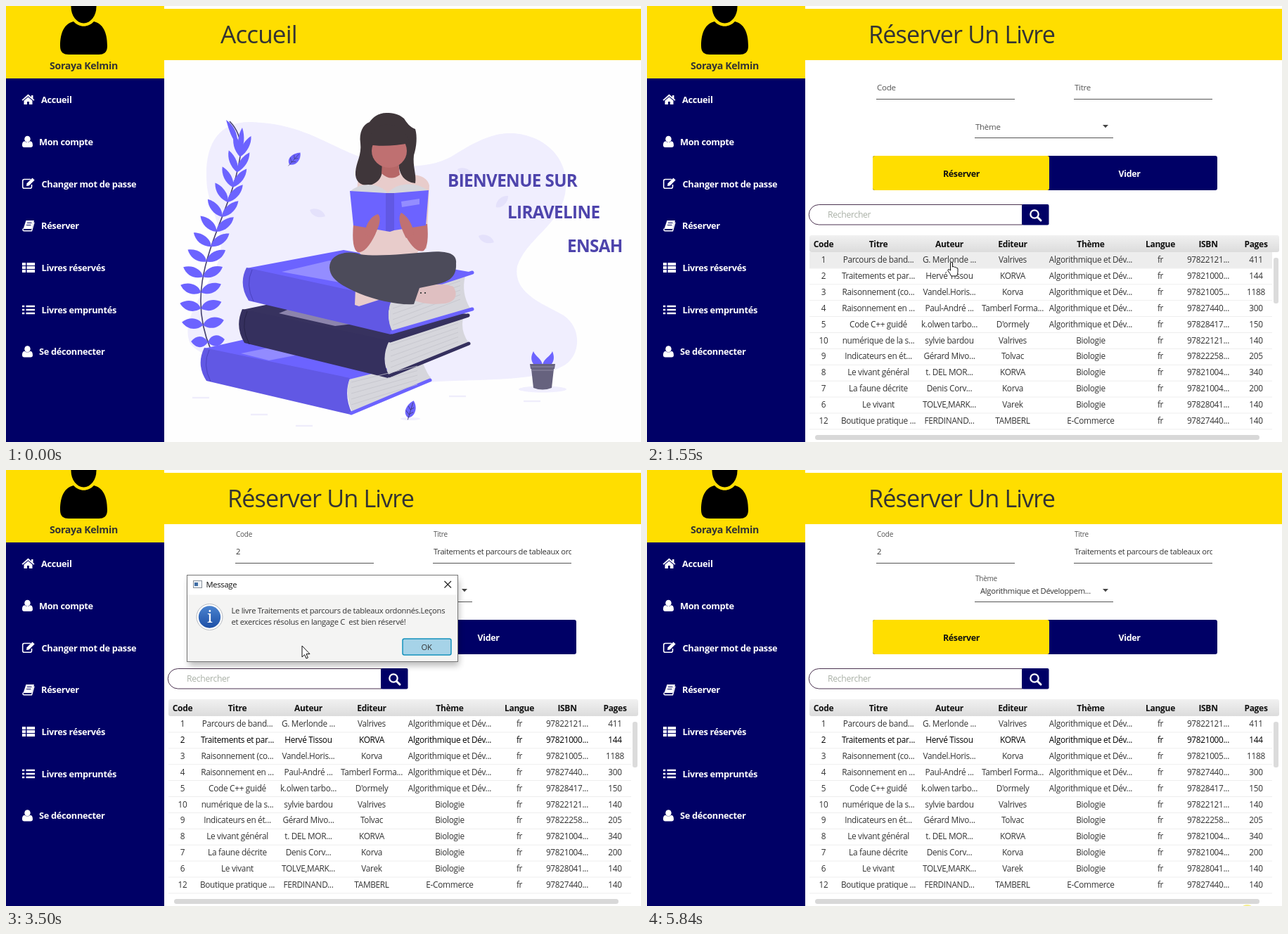
An HTML page that plays this animation: 903 px wide and 620 px high, repeating every 5.93 s.

```html
<!DOCTYPE html>
<html lang="fr">
<head>
<meta charset="utf-8">
<title>Réserver un livre</title>
<style>
html, body { margin: 0; width: 100%; height: 100%; overflow: hidden; background: #fff; }
svg { display: block; }
text { font: 11.2px "Open Sans", "Noto Sans", sans-serif; letter-spacing: -.025em; fill: #333; white-space: pre; }
.b { font-weight: 700; }
.mid { text-anchor: middle; }
.menu text { font-size: 12.8px; font-weight: 700; fill: #fff; }
.title { font-size: 34.2px; }
.hello text { font-size: 24.2px; font-weight: 700; fill: #4e44ac; }
.head text { font-size: 12px; font-weight: 700; fill: #111; text-anchor: middle; }
.rows text { font-size: 11.8px; }
.label { font-size: 11.5px; fill: #555; }
.line { stroke: #555; }

/* every change on screen is a hard step */
.an { animation: 5.93s step-end infinite; }
#home { animation-name: home; }
@keyframes home { 0% { opacity: 1 } 14.33%, 100% { opacity: 0 } }

#side { animation-name: side; }
@keyframes side {
  0% { opacity: 0; transform: translateY(60px) }
  2.19% { opacity: 1; transform: translateY(60px) }
  7.58% { opacity: 1; transform: none }
  15.68%, 100% { opacity: 0; transform: none }
}
#hover { animation-name: hover; }
@keyframes hover {
  0% { opacity: 0; transform: none }
  19.73% { opacity: 1; transform: none }
  28.83% { opacity: 1; transform: translateY(22.9px) }
  42.32% { opacity: 0; transform: none }
  80.26% { opacity: 1; transform: none }
  81.45% { opacity: 1; transform: translateY(114.5px) }
  82.79% { opacity: 1; transform: translateY(137.4px) }
  84.14% { opacity: 1; transform: translateY(183.2px) }
  85.32% { opacity: 1; transform: translateY(206.1px) }
  86.5% { opacity: 1; transform: translateY(229px) }
  87.68%, 100% { opacity: 0; transform: none }
}
.picked text { animation: picked 5.93s step-end infinite; }
@keyframes picked { 35.41%, 100% { fill: #000 } }

#values { animation-name: values; }
@keyframes values { 0% { opacity: 0 } 35.41%, 100% { opacity: 1 } }
.float { animation-name: float; transform-origin: var(--x) var(--y); }
@keyframes float {
  0% { transform: none }
  35.41% { transform: translateY(calc(var(--d) * .6)) scale(.93) }
  36.76%, 100% { transform: translateY(var(--d)) scale(.87) }
}
#press { animation-name: press; }
@keyframes press { 0% { opacity: 0 } 44.35% { opacity: 1 } 59.02%, 100% { opacity: 0 } }
#ripple { animation-name: ripple; transform-origin: 421px 248px; }
@keyframes ripple {
  0% { transform: scale(0); opacity: .31 }
  48.39% { transform: scale(.1) }
  49.74% { transform: scale(.32) }
  51.09% { transform: scale(.58) }
  52.44% { transform: scale(.84) }
  53.62% { transform: scale(1); opacity: .31 }
  55.14% { transform: scale(1); opacity: .15 }
  56.49%, 100% { transform: scale(1); opacity: 0 }
}
#dialog { animation-name: dialog; transform-origin: 450px 210.5px; }
@keyframes dialog {
  0% { opacity: 0; transform: scale(.92) }
  56.49% { opacity: .45; transform: scale(.95) }
  57.84% { opacity: .9; transform: scale(.99) }
  59.02% { opacity: 1; transform: none }
  80.26% { opacity: .85; transform: scale(.992) }
  81.45% { opacity: .53; transform: scale(.981) }
  82.79% { opacity: .18; transform: scale(.965) }
  84.14%, 100% { opacity: 0; transform: scale(.95) }
}
#ok { animation-name: ok; }
@keyframes ok { 69.47% { fill: #c4e8f8 } 78.92%, 100% { fill: #8cc5e0 } }

#cursor { animation-name: move; }
@keyframes move {
  0% { transform: translate(-50px, 0) }
  1.18% { transform: translate(275px, 443px) }
  2.19% { transform: translate(150px, 388px) }
  6.23% { transform: translate(146px, 372px) }
  7.58% { transform: translate(138px, 340px) }
  8.93% { transform: translate(136px, 331px) }
  15.68% { transform: translate(232px, 340px) }
  17.03% { transform: translate(325px, 350px) }
  18.38% { transform: translate(392px, 358px) }
  19.73% { transform: translate(425px, 363px) }
  20.91% { transform: translate(433px, 364px) }
  27.48% { transform: translate(434px, 369px) }
  28.83% { transform: translate(435px, 377px) }
  30.18% { transform: translate(436px, 385px) }
  31.53% { transform: translate(436px, 390px) }
  42.32% { transform: translate(431px, 345px) }
  43.33% { transform: translate(426px, 290px) }
  44.35% { transform: translate(423px, 250px) }
  65.43% { transform: translate(452px, 249px) }
  66.77% { transform: translate(505px, 248px) }
  68.12% { transform: translate(558px, 247px) }
  69.47% { transform: translate(590px, 247px) }
  70.82% { transform: translate(602px, 247px) }
  80.26% { transform: translate(704px, 362px) }
  81.45% { transform: translate(801px, 466px) }
  82.79% { transform: translate(826px, 508px) }
  84.14% { transform: translate(846px, 546px) }
  85.32% { transform: translate(859px, 575px) }
  86.5% { transform: translate(869px, 598px) }
  87.68% { transform: translate(876px, 615px) }
  89.03%, 100% { transform: translate(-50px, 0) }
}
#hand { animation-name: hand; }
#arrow { animation-name: arrow; }
@keyframes hand {
  0% { opacity: 0 } 2.19% { opacity: 1 } 15.68% { opacity: 0 } 22.26% { opacity: 1 }
  42.32% { opacity: 0 } 44.35% { opacity: 1 } 56.49% { opacity: 0 } 80.26% { opacity: 1 }
  87.68%, 100% { opacity: 0 }
}
@keyframes arrow {
  0% { opacity: 1 } 2.19% { opacity: 0 } 15.68% { opacity: 1 } 22.26% { opacity: 0 }
  42.32% { opacity: 1 } 44.35% { opacity: 0 } 56.49% { opacity: 1 } 80.26% { opacity: 0 }
  87.68%, 100% { opacity: 1 }
}
#glow { animation-name: glow; }
@keyframes glow { 0% { opacity: 0 } 98.48%, 100% { opacity: 1 } }
</style>
</head>
<body>
<svg width="903" height="620" viewBox="0 0 903 620">
<defs>
  <linearGradient id="gHead" x2="0" y2="1"><stop stop-color="#f1f1f1"/><stop offset="1" stop-color="#dcdcdc"/></linearGradient>
  <linearGradient id="gInfo" x2="0" y2="1"><stop stop-color="#4a83cf"/><stop offset="1" stop-color="#1d4fa6"/></linearGradient>
  <clipPath id="cTitle"><rect x="607" y="105" width="197" height="24"/></clipPath>
  <clipPath id="cBtn"><rect x="321" y="213" width="251" height="49" rx="3"/></clipPath>
  <filter id="blur" x="-10%" y="-20%" width="120%" height="140%"><feGaussianBlur stdDeviation="5"/></filter>
  <g id="user" fill="#fff"><ellipse cx="7.5" cy="4.3" rx="4.2" ry="4.6"/><path d="M0 13C0 9 1.3 7.4 3.6 7.2Q7.5 11 11.4 7.2C13.7 7.4 15 9 15 13Q15 16 12 16H3Q0 16 0 13Z"/></g>
  <g id="leaf"><path fill="#6c63ff" d="M-8 9C-13 0-3-9 10-9C11 2 2 12-8 9Z"/><path d="M-10 11L8-7M-5 5L-6-2M-5 5L2 5M0 0V-6M0 0L6 0" fill="none" stroke="#3f3d75" stroke-width=".8"/></g>
  <path id="pale" fill="#e4e1fb" d="M-11-4C-4-8 8-5 11 5C3 8-8 6-11-4Z"/>
</defs>

<rect width="903" height="620" fill="#fff"/>
<rect x="225" y="4" width="678" height="73" fill="#ffde00"/>

<g id="page">
  <text class="title" x="315" y="53">Réserver Un Livre</text>
  <path class="line" d="M326 132.5H523M607 132.5H804M466 187.5H663"/>
  <text class="label an float" style="--x:327px;--y:120px;--d:-24.5px" x="327" y="120">Code</text>
  <text class="label an float" style="--x:608px;--y:120px;--d:-24.5px" x="608" y="120">Titre</text>
  <text class="label an float" style="--x:467px;--y:176px;--d:-18px" x="467" y="176">Thème</text>
  <path d="M648 169h8l-4 4.2z" fill="#444"/>
  <g id="values" class="an">
    <text x="327" y="120">2</text>
    <text x="608" y="120" clip-path="url(#cTitle)">Traitements et parcours de tableaux ordonnés</text>
    <text x="474" y="176">Algorithmique et Développem...</text>
  </g>
  <rect x="321" y="213" width="490" height="49" rx="3" fill="#000066"/>
  <rect x="321" y="213" width="251" height="49" rx="3" fill="#ffde00"/>
  <text class="b mid" x="447" y="242.5" style="font-size:12.4px;fill:#111">Réserver</text>
  <text class="b mid" x="686" y="242.5" style="font-size:12.4px;fill:#fff">Vider</text>
  <g id="press" class="an" clip-path="url(#cBtn)">
    <rect x="321" y="213" width="251" height="49" fill="#000066"/>
    <circle id="ripple" class="an" cx="421" cy="248" r="65" fill="#fff"/>
    <text class="b mid" x="447" y="242.5" style="font-size:12.4px;fill:#fff">Réserver</text>
  </g>
  <path d="M534 282.5H244.5a14.2 14.2 0 0 0 0 28.5H534z" fill="#fff" stroke="#4b3350"/>
  <text x="257" y="301" style="font-size:12.2px;fill:#a9b0a6">Rechercher</text>
  <rect x="533" y="282" width="38.5" height="29.5" rx="2" fill="#000066"/>
  <path d="M555.5 300.5L560 305" stroke="#fff" stroke-width="3" stroke-linecap="round"/>
  <circle cx="551" cy="296" r="5.7" fill="none" stroke="#fff" stroke-width="2.3"/>
  <rect x="231" y="326" width="668" height="24" rx="3" fill="url(#gHead)"/>
  <g id="head" class="head"></g>
  <rect id="hover" class="an" x="231" y="350" width="658" height="22.9" fill="#ededed"/>
  <g id="rows" class="rows"></g>
  <rect x="891" y="358" width="7" height="65" rx="3" fill="#dbdbdb"/>
  <rect x="239" y="610" width="632" height="7" rx="3.5" fill="#d8d8d8"/>
</g>

<g id="home" class="an">
  <rect x="225" y="77" width="678" height="543" fill="#fefefe"/>
  <rect x="225" y="4" width="678" height="73" fill="#ffde00"/>
  <text class="title" x="305" y="53" style="font-size:35.2px">Accueil</text>
  <path fill="#f0eefe" d="M286 258C280 200 300 163 350 165C430 168 465 205 520 220C570 232 610 230 640 210C680 185 700 180 722 181C765 184 800 215 796 260C792 310 740 330 727 370C720 410 768 425 793 440C820 458 818 500 790 513C750 535 680 530 600 535C500 540 290 520 262 480C244 440 300 390 305 350C310 320 291 290 286 258Z"/>
  <g fill="#f0eefe"><ellipse cx="763" cy="545" rx="34" ry="4.5"/><ellipse cx="575" cy="587" rx="14" ry="2"/></g>
  <path stroke="#efedfb" stroke-width="2.5" d="M265 557h24M348 581h24M412 597h24M630 555h24M736 562h24"/>
  <use href="#pale" x="443" y="294"/><use href="#pale" x="683" y="331"/><use href="#pale" x="653" y="236"/>
  <use href="#pale" transform="translate(705 278) rotate(-65)"/>
  <use href="#leaf" transform="translate(410 217) rotate(-3) scale(.9)"/>
  <use href="#leaf" transform="translate(575 574) rotate(-28)"/>
  <g id="plant" fill="#6c63ff"></g>

  <!-- lower book -->
  <path fill="#6c63ff" d="M282 487L340 474L604 528L490 534Z"/>
  <path fill="#928bff" d="M334 494L384 484L426 494L374 504Z"/>
  <path fill="#d6d6dc" d="M488 531L592 505Q596 518 605 531L492 577Q482 555 488 531Z"/>
  <path fill="#6158e4" d="M282 486L489 529Q480 554 492 579L490 581L285 533Q270 510 282 486Z"/>
  <path fill="none" stroke="#6c63ff" stroke-width="5" stroke-linecap="round" d="M491 579L603 532"/>
  <path fill="none" stroke="#4a42c0" d="M289 489Q279 510 291 534"/>
  <!-- middle book -->
  <path fill="#37325f" d="M336 432L398 419L660 438L545 479Z"/>
  <path fill="#8c84ac" d="M388 437L410 428L500 451L468 455Z"/>
  <path fill="#d6d6dc" d="M544 478L650 444Q646 462 658 479L545 524Q533 502 544 478Z"/>
  <path fill="#35305e" d="M336 431L545 476Q532 502 545 526L543 529L339 479Q325 456 336 431Z"/>
  <path fill="none" stroke="#35305e" stroke-width="5" stroke-linecap="round" d="M545 526L658 480M546 476L657 440"/>
  <path fill="none" stroke="#262248" d="M343 434Q333 456 346 481"/>
  <!-- upper book -->
  <path fill="#6c63ff" d="M342 373L480 347L664 379L548 419Z"/>
  <path fill="#948dff" d="M392 378L460 362L540 380L502 398Z"/>
  <path fill="#d6d6dc" d="M548 418L653 384Q647 408 660 430L548 463Q539 440 548 418Z"/>
  <path fill="#6158e4" d="M342 372L549 417Q538 440 550 464L547 467L345 419Q330 395 342 372Z"/>
  <path fill="none" stroke="#6c63ff" stroke-width="5" stroke-linecap="round" d="M549 464L663 431M550 416L663 379"/>
  <path fill="none" stroke="#4a42c0" d="M350 375Q340 396 352 420"/>
  <g id="pages" fill="none" stroke="#c4c4cc" stroke-width=".8"></g>

  <!-- reader -->
  <path fill="#e8cccb" d="M500 250C515 244 528 240 534 236H558C575 240 598 238 602 255L598 345L588 347L580 357H508L497 345Z"/>
  <path fill="#3f363a" d="M541 152C529 152 521 159 517 165C507 169 502 180 504 195C506 212 498 222 497 236C496 250 505 256 517 255C528 252 534 245 535 235L558 225C560 240 566 250 582 252C584 240 578 228 580 212C584 200 585 185 582 175C574 172 570 166 566 160C558 153 550 152 541 152Z"/>
  <path fill="#b66767" d="M535 222H558L560 240Q547 250 534 238Z"/>
  <ellipse cx="545" cy="206" rx="25" ry="24" fill="#bf7071"/>
  <path fill="#3f363a" d="M515 197C530 200 555 199 574 195C572 180 555 168 541 168C526 170 515 182 515 197Z"/>
  <path fill="#c07172" d="M494 310Q491 345 500 350Q512 352 525 325L530 310ZM599 310Q602 340 594 348Q583 352 570 330L560 310Z"/>
  <path fill="#d6d6dc" d="M490 263C505 250 530 251 543 266C556 250 585 250 601 263L598 275H493Z"/>
  <path fill="#6c63ff" d="M489 263L540 266V320L494 312Z"/>
  <path fill="#6c63ff" d="M552 266L601 262L597 312L552 319Z"/>
  <path fill="#6158e4" d="M540 266L552 266V319L546 321L540 320Z"/>
  <path fill="#948dff" d="M562 278L588 274V282L563 286Z"/>
  <path fill="#c07172" d="M510 325C511 310 520 298 529 296C535 302 530 316 522 330ZM580 325C579 310 570 298 562 294C556 302 562 316 569 330Z"/>
  <path fill="#e8cccb" d="M497 401L545 412L530 418L502 427L496 425Z"/>
  <path fill="#dfbfc1" d="M580 404C600 394 625 394 636 399C643 410 640 420 625 423C605 425 588 423 578 417Z"/>
  <path fill="#4c4b5a" d="M460 372C460 352 485 347 503 353C530 357 570 352 600 350C622 348 642 350 640 366C641 384 632 392 612 396L588 401L580 424C560 426 525 418 503 409C475 397 461 388 460 372Z"/>
  <path d="M589 408h2M595 408h2" stroke="#444" stroke-width="2"/>

  <path fill="#6c63ff" d="M750 491C753 499 762 501 763 511H752C746 506 746 498 750 491ZM777 491C774 499 764 501 763 511H774C780 506 780 498 777 491Z"/>
  <path fill="#66627e" d="M745 509H781L780 516H779L776 543Q763 548 750 543L747 516H746Z"/>
  <path d="M747 513H779M748 518H778" stroke="#908ca5"/>
  <g class="hello"><text x="628" y="257">BIENVENUE SUR</text><text x="713" y="302">LIRAVELINE</text><text x="798" y="350">ENSAH</text></g>
</g>

<rect width="225" height="620" fill="#000066"/>
<rect width="225" height="103" fill="#ffde00"/>
<ellipse cx="110.5" cy="1" rx="18" ry="23.5"/>
<path d="M77 57C77 36 84 25 96 22C104 31 117 31 125 22C137 25 144 36 144 57C144 66 139 69 132 69H89C82 69 77 66 77 57Z"/>
<text class="b mid" x="110.5" y="90" style="font-size:14.2px">Soraya Kelmin</text>
<rect id="side" class="an" y="282" width="225" height="60" rx="2" fill="#12129a"/>
<g class="menu">
  <path fill="#fff" d="M31.5 125.5L36 129.5V127H38.5V131.7L40.5 133.5L39.3 134.8L31.5 128.2L23.7 134.8L22.5 133.5Z"/>
  <path fill="#fff" d="M25.5 134.5L31.5 129.5L37.5 134.5V140H33V136H30V140H25.5Z"/>
  <use href="#user" x="23" y="185"/>
  <path d="M35 246.5H26Q23.7 246.5 23.7 249V257Q23.7 259.3 26 259.3H34Q36.5 259.3 36.5 257V254" fill="none" stroke="#fff" stroke-width="1.6"/>
  <path d="M29 256L29.6 252.3L37.5 244.5L40.7 247.6L32.7 255.4Z" fill="#fff"/>
  <path d="M28.5 305H40L36.5 317H24.5Z" fill="#fff"/>
  <path d="M24.5 316.5Q23 319.7 26 319.7H36.5L40 307.5" fill="none" stroke="#fff" stroke-width="1.5"/>
  <path d="M30 308.5h6.5M29 311.5h6.5" stroke="#000066"/>
  <path d="M23 367h5M23 372h5M23 377h5M29.5 367H41M29.5 372H41M29.5 377H41" stroke="#fff" stroke-width="3.8"/>
  <path d="M23 427h3.3M23 432h3.3M23 437h3.3M28.5 427H41M28.5 432H41M28.5 437H41" stroke="#fff" stroke-width="2.5"/>
  <use href="#user" x="23" y="483.5"/>
  <text x="50" y="138">Accueil</text><text x="47" y="197.5">Mon compte</text>
  <text x="50.5" y="257.5">Changer mot de passe</text><text x="50" y="317">Réserver</text>
  <text x="50.5" y="376.5">Livres réservés</text><text x="50.5" y="436.5">Livres empruntés</text>
  <text x="47" y="496">Se déconnecter</text>
</g>

<g id="dialog" class="an">
  <rect x="260" y="156" width="384" height="122" fill="#000" opacity=".28" filter="url(#blur)"/>
  <rect x="257.5" y="149.5" width="385" height="123" fill="#f4f4f3" stroke="#777"/>
  <rect x="258" y="150" width="384" height="27.5" fill="#fff"/>
  <rect x="266.5" y="157.5" width="12" height="10" fill="#eef2f6" stroke="#8a929c"/>
  <rect x="268" y="160" width="5" height="5" fill="#3f6da5"/>
  <text x="284.5" y="167" style="fill:#111">Message</text>
  <path d="M623.5 158l9.5 9.5M633 158l-9.5 9.5" stroke="#222" stroke-width="1.2"/>
  <circle cx="289.5" cy="209" r="18.5" fill="#fff" stroke="#b9bcc2"/>
  <circle cx="289.5" cy="209" r="15.7" fill="url(#gInfo)"/>
  <text class="mid" x="289.5" y="217" style="font:24px 'Noto Serif',serif;fill:#fff">i</text>
  <text x="320.5" y="204">Le livre Traitements et parcours de tableaux ordonnés.Leçons</text>
  <text x="320.5" y="220">et exercices résolus en langage C  est bien réservé!</text>
  <rect id="ok" class="an" x="564" y="240" width="69" height="23" rx="2.5" fill="#a6d3e8" stroke="#1592bd" stroke-width="1.5"/>
  <text class="mid" x="598" y="255.5">OK</text>
</g>

<ellipse id="glow" class="an" cx="853.5" cy="621" rx="6.5" ry="3" fill="#f6ef8c"/>
<g id="cursor" class="an" fill="#fff" stroke="#111" stroke-linejoin="round">
  <path id="hand" class="an" d="M-1.5 1Q0-.8 1.5 1V7Q3.5 5.8 4.5 7.5Q6.4 6.6 7 8.4Q9 8 9 10V14Q9 17 7.5 20H-.5Q-1.5 17-5 12.5Q-5.5 10.3-3.5 10.5L-1.5 12Z"/>
  <path id="arrow" class="an" d="M-2 0V16L1.6 12.6L4 18L6.4 17L4 11.6H9Z"/>
</g>
</svg>
<script>
const $ = id => document.getElementById(id);
const cols = [251, 329, 430, 520, 631, 730, 798, 866];
const cells = (list, y) => list.map((s, i) => `<text class="mid" x="${cols[i]}" y="${y}">${s}</text>`).join('');
const algo = 'Algorithmique et Dév...', bio = 'Biologie';
const books = [
  [1, 'Parcours de band...', 'G. Merlonde ...', 'Valrives', algo, '97822121...', 411],
  [2, 'Traitements et par...', 'Hervé Tissou', 'KORVA', algo, '97821000...', 144],
  [3, 'Raisonnement (co...', 'Vandel.Horis...', 'Korva', algo, '97821005...', 1188],
  [4, 'Raisonnement en ...', 'Paul-André ...', 'Tamberl Forma...', algo, '97827440...', 300],
  [5, 'Code C++ guidé', 'k.olwen tarbo...', "D'ormely", algo, '97828417...', 150],
  [10, 'numérique de la s...', 'sylvie bardou', 'Valrives', bio, '97822121...', 140],
  [9, 'Indicateurs en ét...', 'Gérard Mivo...', 'Tolvac', bio, '97822258...', 205],
  [8, 'Le vivant général', 't. DEL MOR...', 'KORVA', bio, '97821004...', 340],
  [7, 'La faune décrite', 'Denis Corv...', 'Korva', bio, '97821004...', 200],
  [6, 'Le vivant', 'TOLVE,MARK...', 'Varek', bio, '97828041...', 140],
  [12, 'Boutique pratique ...', 'FERDINAND...', 'TAMBERL', 'E-Commerce', '97827440...', 140]
];
$('head').innerHTML = cells(['Code', 'Titre', 'Auteur', 'Editeur', 'Thème', 'Langue', 'ISBN', 'Pages'], 342.5);
$('rows').innerHTML = books.map((b, i) => {
  const y = 350 + 22.9 * i;
  const row = [...b.slice(0, 5), 'fr', ...b.slice(5)];
  return `<path d="M231 ${y + 22.9}H889" stroke="#eee"/><g${i === 1 ? ' class="picked"' : ''}>${cells(row, y + 15)}</g>`;
}).join('');

// leaves in pairs along a curved stem, slimmer and steeper towards the tip
const bez = (a, b, c, d, t) => {
  const s = 1 - t;
  return s * s * s * a + 3 * s * s * t * b + 3 * s * t * t * c + t * t * t * d;
};
let plant = '<path d="M291 488C245 380 325 300 334 205Q334 180 318 164" fill="none" stroke="#454070" stroke-width="1.6"/>';
for (let i = 0; i <= 12; i++) {
  const t = .03 + i * .078;
  const x = bez(291, 245, 325, 334, t), y = bez(488, 380, 300, 205, t);
  const long = i ? 1 + .12 * t : .8, wide = 1 - .42 * t;
  for (const side of [-1, 1]) {
    const turn = side < 0 ? 4 - 80 * t : -4 - 58 * t;
    plant += `<path transform="translate(${x} ${y}) scale(${side} 1) rotate(${turn}) scale(${long} ${wide})" d="M0 0C6-11 20-12 30-2C22 8 10 10 0 0Z"/>`;
  }
}
plant += '<path d="M313 162C324 169 330 182 329 196C321 190 317 176 313 162ZM333 208C328 195 330 183 336 173C340 186 339 198 333 208Z"/>';
$('plant').innerHTML = plant;

// page edges of the three books
$('pages').innerHTML = [[552, 422, 96, -31], [549, 482, 96, -31], [493, 535, 94, -23]].map(([x, y, w, h]) =>
  [0, 1, 2, 3, 4].map(i => `<path d="M${x - 2} ${y + i * 8}l${w} ${h - i * 1.5}"/>`).join('')).join('');
</script>
</body>
</html>
```
